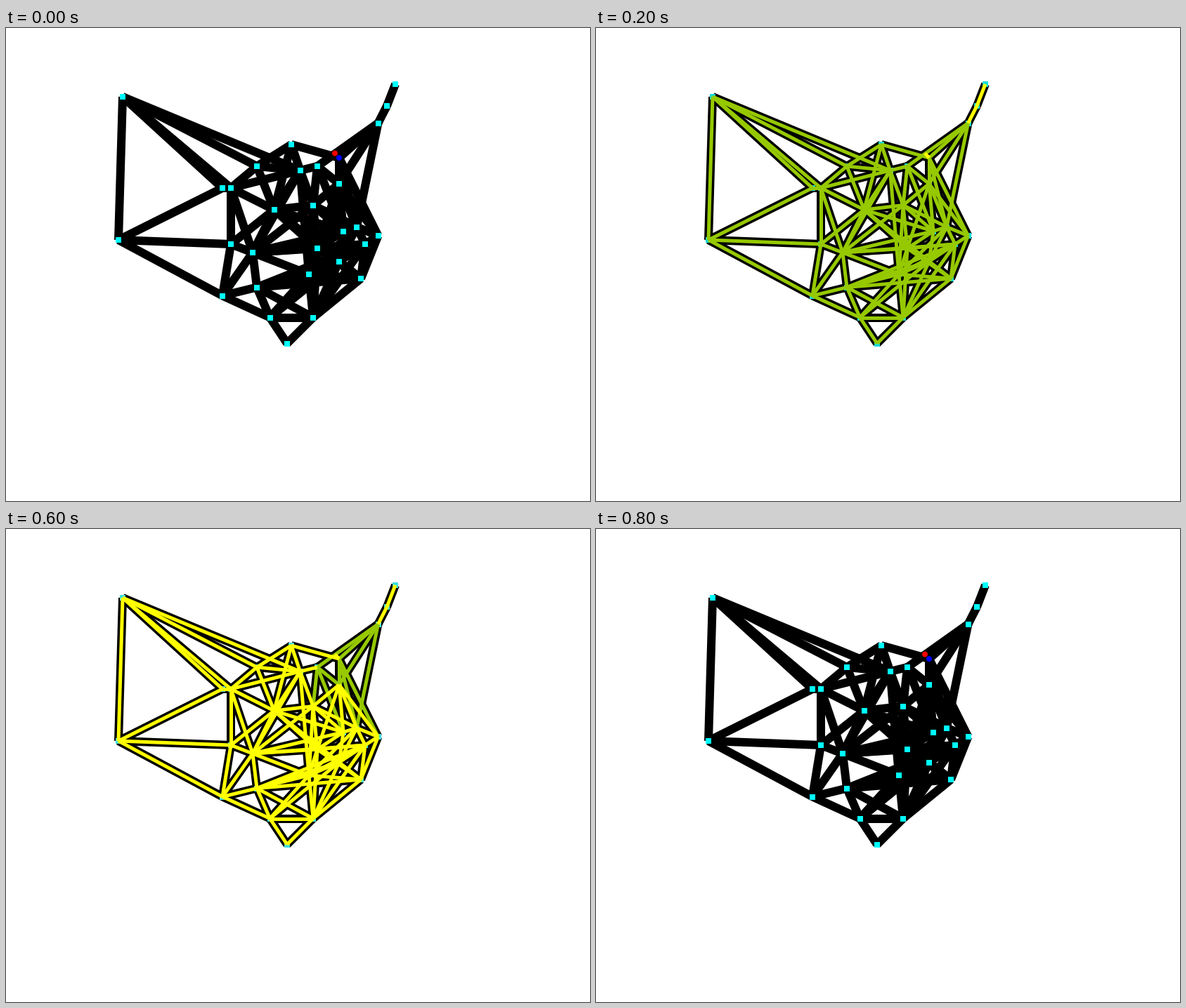
Recreate the animation shown at these times as a matplotlib script. Size 831 px wide and 674 px high, loop 3000 ms.

```python
import matplotlib.pyplot as plt
from matplotlib.animation import FuncAnimation
from matplotlib.collections import LineCollection

W, H, DPI = 831, 674, 100
PX = 72 / DPI

NODES = dict(
    A=(166, 98), B=(160, 302), C=(308, 228), D=(320, 228), E=(357, 197),
    F=(406, 166), G=(418.5, 203), H=(443, 197), I=(468, 178.5), J=(474, 185),
    K=(474, 222), L=(437, 252.5), M=(381.5, 259), N=(529.5, 135.5),
    O=(542, 111), P=(554, 80), Q=(529.5, 296), R=(511, 308), S=(499, 283.5),
    T=(480, 289.5), U=(443, 314), V=(474, 332.5), W=(431, 351),
    X=(505, 357), Y=(437, 412.5), Z=(375.5, 412.5), a=(400, 449.5),
    b=(308, 381.5), c=(357, 369.5), d=(351, 320), e=(320, 308))

# Each word is a node followed by the nodes it links to.
LINKS = """ABCDEG BCeb CD DEGMed EFGM FGMJ GHMLWd HKLTN IJ JKSQN KLTSUQN
LMTSUWd MedTVU NOS OP QSRX RSXUVWdcY STVW TUVd UVWdXY VWXcYZ WdcXYZ
XYc YZac Zabc bedc cd de"""
GREEN_MID = """FJE ED De Dd FM GHW HKLTN JKSQN KLTUN MLTVU NS WX IJ"""


def parse(text):
    return {frozenset(word[0] + end) for word in text.split() for end in word[1:]}


EDGES = sorted(parse(LINKS), key=sorted)
BRIDGES = parse("PO ON IJ")
MID = parse(GREEN_MID) - BRIDGES
EARLY = set(EDGES) - BRIDGES - parse("ABCDEG BCeb CD Zab Ya bc")
LATE = parse("NHJKS JKSQ HKLT")
LAST = parse("NHJ JK")

YELLOW, GREEN, OLIVE = (1, 1, 0), (0.59, 0.79, 0), (0.65, 0.67, 0.06)
CYAN, TEAL, PALE = (0, 1, 1), (0.08, 0.86, 0.86), (0.4, 0.87, 0.87)

# start frame, marked edges, mark colour, node colour
STAGES = [
    (1, set(), GREEN, "white"),
    (2, set(EDGES) - BRIDGES, GREEN, TEAL),
    (4, EARLY, GREEN, TEAL),
    (5, MID, GREEN, TEAL),
    (6, LATE, GREEN, (0.25, 0.87, 0.87)),
    (7, LAST, OLIVE, PALE),
]


def segments(edges):
    return [[NODES[n] for n in sorted(edge)] for edge in edges]


fig = plt.figure(figsize=(W / DPI, H / DPI), dpi=DPI, facecolor="white")
ax = fig.add_axes([0, 0, 1, 1])
ax.set_xlim(0, W)
ax.set_ylim(H, 0)
ax.axis("off")

ax.add_collection(LineCollection(segments(EDGES), colors="black",
                                 linewidths=12 * PX, capstyle="butt", zorder=1))
squares = [p for n, p in NODES.items() if n not in "IJ"]
dots = ax.scatter(*zip(*squares), s=(8 * PX) ** 2, marker="s",
                  linewidths=0, zorder=2)
ends = ax.scatter(*zip(NODES["I"], NODES["J"]), s=(8 * PX) ** 2,
                  c=["red", "blue"], linewidths=0, zorder=3)
trails = LineCollection([], linewidths=5 * PX, capstyle="butt", zorder=4)
ax.add_collection(trails)


def draw(frame):
    idle = frame == 0 or frame >= 8
    trails.set_visible(not idle)
    ends.set_visible(idle)
    if idle:
        dots.set_facecolor(CYAN)
    else:
        _, marked, color, node_color = [s for s in STAGES if s[0] <= frame][-1]
        fading = color == OLIVE
        ordered = sorted(EDGES, key=lambda edge: (edge in marked) == fading)
        if not fading:
            ordered = sorted(EDGES, key=lambda edge: edge not in marked)
        else:
            ordered = sorted(EDGES, key=lambda edge: edge in marked)
        trails.set_segments(segments(ordered))
        trails.set_color([color if edge in marked else YELLOW for edge in ordered])
        dots.set_facecolor(node_color)
    return dots, ends, trails


anim = FuncAnimation(fig, draw, frames=30, interval=100, repeat=True,
                     repeat_delay=0, blit=False)
plt.show()
```
